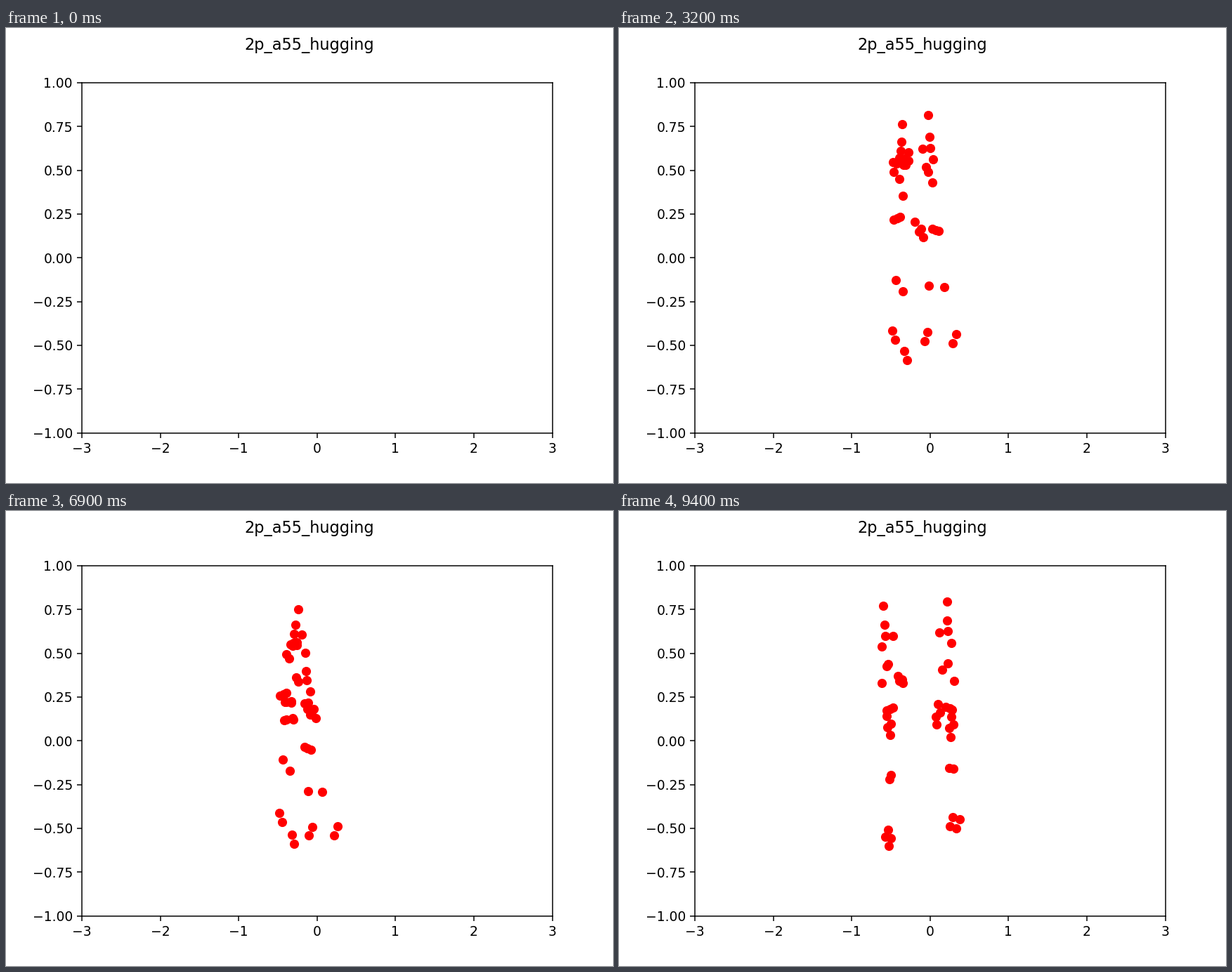
These frames come from a looping animation (864 by 648 pixels, 9500 ms). A matplotlib script:

```python
import numpy as np
import matplotlib.pyplot as plt
from matplotlib.animation import FuncAnimation

FRAMES = 95
SPINE = (0, 0.185, 0.287, 0.585, 1)     # head, neck, chest, mid spine, hips
HAND = (-0.22, -0.06, 0.04, 0.22)       # wrist to fingertips along the forearm


def pose(head, hips, hand_a, hand_b, foot_a, foot_b):
    """Key points of one person in stage pixels."""
    return np.array([head, hips, hand_a, hand_b, foot_a, foot_b], dtype=float)


def change(base, **points):
    """Copy a pose with some of its key points moved."""
    names = ("head", "hips", "hand_a", "hand_b", "foot_a", "foot_b")
    new = base.copy()
    for name, point in points.items():
        new[names.index(name)] = point
    return new


# Person on the left, facing right
left_idle = pose((391, 135), (397, 274), (386, 246), (396, 300),
                 (392, 428), (388, 459))
left_meet = pose((404, 138), (396, 272), (406, 190), (429, 288),
                 (389, 431), (407, 461))
left_hug = change(left_meet, head=(417, 140), hips=(395, 262),
                  hand_a=(418, 172), hand_b=(433, 275))
left_hold = change(left_hug, hand_a=(413, 190), hand_b=(437, 285))
left_part = change(left_meet, head=(408, 140), hips=(396, 281),
                   hand_a=(428, 162), hand_b=(404, 315))
left_rest = pose((377, 136), (386, 283), (402, 241), (385, 306),
                 (384, 454), (380, 465))

# Person on the right, facing left
right_idle = pose((467, 129), (471, 281), (455, 291), (474, 308),
                  (476, 437), (485, 440))
right_meet = pose((440, 125), (451, 288), (407, 188), (401, 194),
                  (440, 434), (480, 436))
right_tall = change(right_meet, head=(440, 120))
right_hug = pose((432, 195), (437, 336), (403, 272), (404, 278),
                 (436, 450), (472, 450))
right_hold = change(right_hug, head=(427, 203), hips=(430, 339),
                    hand_b=(404, 297))
right_part = change(right_meet, head=(435, 126), hips=(446, 282),
                    hand_a=(430, 252), hand_b=(441, 288))

KEYS = [(1, left_idle, right_idle), (21, left_idle, right_idle),
        (32, left_meet, right_meet), (37, left_meet, right_tall),
        (41, left_hug, right_hug), (44, left_hug, right_hug),
        (58, left_hold, right_hold), (69, left_hold, right_hold),
        (73, left_part, right_part), (79, left_part, right_part),
        (89, left_rest, right_idle), (94, left_rest, right_idle)]

rng = np.random.default_rng(4)
spread = rng.normal(0, 1.8, (4, 2))
phase = rng.uniform(0, 2 * np.pi, (50, 2))
speed = rng.uniform(0.4, 1.1, (50, 2))


def arm(shoulder, hand, side):
    """Elbow and hand joints; a slack arm drops its elbow back and down."""
    reach = hand - shoulder
    slack = max(0, 1 - np.hypot(*reach) / 120)
    elbow = shoulder + 0.45 * reach + (-side * (4 + 16 * slack), 25 * slack)
    palm = [hand + k * (hand - elbow) + s for k, s in zip(HAND, spread)]
    return [elbow, *palm]


def leg(hips, ankle, side):
    """Knee, ankle and foot."""
    knee = hips + 0.55 * (ankle - hips) + (3 * side, 0)
    return [knee, ankle, ankle + (4 * side, 13)]


def body(points, side):
    """All 25 joints of a person facing side (+1 right, -1 left)."""
    head, hips, hand_a, hand_b, foot_a, foot_b = points
    spine = [head + k * (hips - head) for k in SPINE]
    chest = spine[2]
    near = chest + (11 * side, 1)
    far = chest + (-5 * side, 16)
    tilt = np.array([4.5 * side, -2])
    return np.array([*spine, hips + tilt, hips - tilt, near, far,
                     *arm(near, hand_a, side), *arm(far, hand_b, side),
                     *leg(hips, foot_a, side), *leg(hips, foot_b, side)])


def joints(frame):
    """Both people at a frame, eased between poses, with a slight sway."""
    for (t0, l0, r0), (t1, l1, r1) in zip(KEYS, KEYS[1:]):
        if frame <= t1:
            break
    u = (frame - t0) / (t1 - t0)
    ease = u * u * (3 - 2 * u)
    left = body(l0 + (l1 - l0) * ease, 1)
    right = body(r0 + (r1 - r0) * ease, -1)
    sway = 0.5 * np.sin(speed * frame + phase)
    return np.vstack([left, right]) + sway


fig, ax = plt.subplots(figsize=(6.4, 4.8), dpi=135)
fig.subplots_adjust(left=0.125, right=0.9, bottom=0.11, top=0.88)
fig.suptitle("2p_a55_hugging")
ax.set_xlim(-3, 3)
ax.set_ylim(-1, 1)
dots, = ax.plot([], [], "ro")


def update(frame):
    if frame == 0:
        dots.set_data([], [])
    else:
        x, y = joints(frame).T
        dots.set_data((x - 443.4) / 111.6, (327.9 - y) / 249.48)
    return dots,


anim = FuncAnimation(fig, update, frames=FRAMES, interval=100,
                     repeat=True, repeat_delay=0)
plt.show()
```
